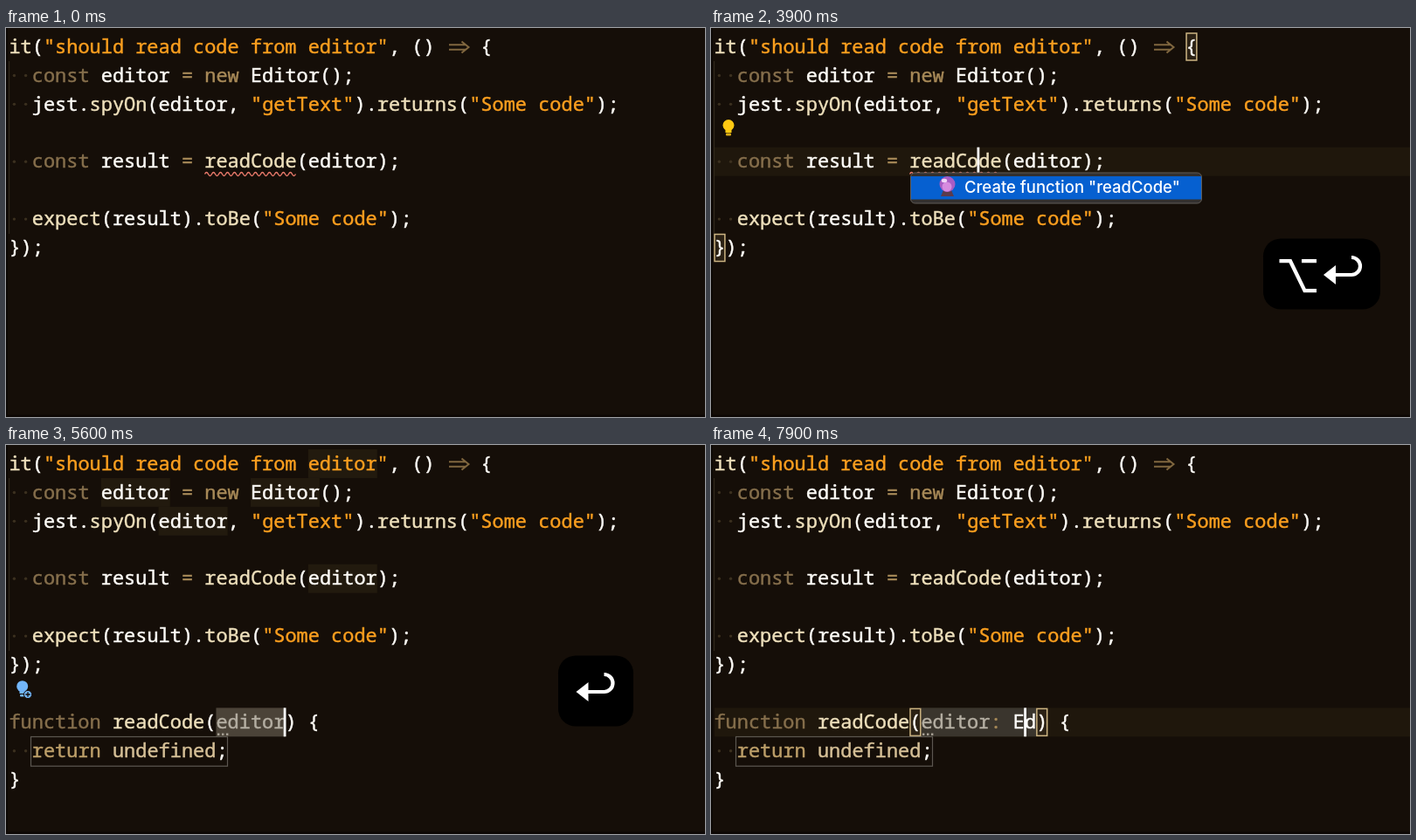
An HTML page that plays this animation: 800x446 px, repeating every 8000 ms.

```html
<!DOCTYPE html>
<html lang="en">
<head>
<meta charset="utf-8">
<title>Create function from test</title>
<style>
  html, body { margin: 0; width: 100%; height: 100%; overflow: hidden; background: #150e08; }
  svg { display: block; }
  .code { font: 500 21.95px "Noto Sans Mono", "DejaVu Sans Mono", monospace; white-space: pre; stroke-width: .45px; }
  .menu { font: 500 18.5px Inter, sans-serif; fill: #fff; }
</style>
</head>
<body>
<svg id="stage" width="800" height="446" viewBox="0 0 800 446"></svg>
<script>
const LOOP = 8000, CHAR = 13.17, LINE = 32.93;
const stage = document.getElementById('stage');
const colX = c => 3.4 + c * CHAR;
const rowY = r => 5 + r * LINE;

const COLORS = {
  w: '#fffdf8', // plain
  f: '#eee0bc', // function
  k: '#866f4c', // declaration keyword
  o: '#a88a58', // operator
  s: '#fb9f1f', // string
  r: '#bd9f69', // return
  u: '#d6c097', // undefined
  g: '#b5afa3'  // unused
};

// Moments of the story, in ms
const CLICK = 2200, KEY1 = 3400, MENU = 3600, KEY2 = 4300, CREATE = 4340,
  UNBRACE = 4500, CHECKED = 5100, BULB = 5450, DESELECT = 6500;
const KEY_LIFE = 1700, KEY_FADE = 200, CARET_MOVE = 80;
const TYPED = ': Ed', TYPE_AT = [7300, 7500, 7720, 7895];

const rect = (x, y, w, h, fill, extra = '') =>
  `<rect x="${x}" y="${y}" width="${w}" height="${h}" fill="${fill}" ${extra}/>`;
const cells = (row, col, n, fill) => rect(colX(col), rowY(row), n * CHAR, LINE, fill);
const stroke = (d, color, width) =>
  `<path d="${d}" fill="none" stroke="${color}" stroke-width="${width}"/>`;
const escapeText = s => s.replace(/&/g, '&amp;').replace(/</g, '&lt;');

// Parts alternate: colour key, text
function line(row, col, ...parts) {
  let out = '';
  for (let i = 0; i < parts.length; i += 2) {
    const color = COLORS[parts[i]], text = parts[i + 1];
    out += `<text class="code" x="${colX(col)}" y="${rowY(row) + 23.7}" fill="${color}" stroke="${color}">${escapeText(text)}</text>`;
    col += text.length;
  }
  return out;
}

const dots = row => [0, 1].map(c =>
  `<circle cx="${colX(c) + 6}" cy="${rowY(row) + 16.5}" r="1.7" fill="#3b301f"/>`).join('');

const bracketBox = (row, col) =>
  rect(colX(col) + .7, rowY(row) + 1, 11.8, 31, '#2b2114', 'stroke="#cdb583" stroke-width="1.5"');

const SQUIGGLE = stroke('M227.5 167.5' + 'q2 -4 4 0t4 0'.repeat(13), '#e8796a', 1.4);

const TEST = [1, 2, 4, 6].map(dots).join('') +
  line(0, 0, 'f', 'it', 'w', '(', 's', '"should read code from editor"', 'w', ', ()') +
  stroke('M507 19.3H526M507 24.7H526M521.5 15.5L529.5 22L521.5 28.5', '#80673f', 2) +
  line(0, 41, 'w', '{') +
  line(1, 2, 'k', 'const', 'w', ' editor ', 'o', '= new', 'w', ' Editor();') +
  line(2, 2, 'w', 'jest.', 'f', 'spyOn', 'w', '(editor, ', 's', '"getText"', 'w', ').', 'f', 'returns', 'w', '(', 's', '"Some code"', 'w', ');') +
  line(4, 2, 'k', 'const', 'w', ' result ', 'o', '= ', 'f', 'readCode', 'w', '(editor);') +
  line(6, 2, 'f', 'expect', 'w', '(result).', 'f', 'toBe', 'w', '(', 's', '"Some code"', 'w', ');') +
  line(7, 0, 'w', '});');

const WORDS = [[0, 26], [1, 8], [1, 21], [2, 13], [4, 26]]
  .map(([row, col]) => cells(row, col, 6, '#221a0e')).join('');

const YELLOW_BULB =
  '<circle cx="20" cy="111.5" r="6.5" fill="#ffc912"/>' +
  rect(16.5, 114, 7, 6, '#ffc912') + rect(17, 120.5, 6, 3, '#d9ab16', 'rx="1"');

const BLUE_BULB =
  '<circle cx="18.7" cy="276.7" r="6.5" fill="#72b6fa"/>' +
  rect(15.5, 280, 6.5, 5, '#72b6fa') + rect(16, 286, 5, 2.5, '#72b6fa', 'rx="1"') +
  '<circle cx="25" cy="286" r="4.6" fill="#72b6fa" stroke="#150e08" stroke-width="1"/>' +
  stroke('M22.3 286h5.4M25 283.3v5.4', '#150e08', 1.3);

const MENU_BOX =
  rect(228.5, 166, 333, 35, '#33302f', 'rx="5" stroke="#605c58" stroke-width="1"') +
  rect(229, 170, 332, 26.5, '#0660d0') +
  '<path d="M263 193l3-7h9l3 7z" fill="#5b3b4c"/>' +
  '<circle cx="270.5" cy="179" r="9" fill="#a85cc4"/>' +
  '<circle cx="270" cy="182" r="5.5" fill="#d78bdf"/>' +
  '<ellipse cx="267" cy="175" rx="3.2" ry="2.2" fill="#f0d5f7"/>' +
  '<text class="menu" x="290" y="189">Create function "readCode"</text>';

const arrow = x =>
  `<g transform="translate(${x} 0)">` +
  stroke('M32 21.5a10 10 0 0 1 0 20H11', '#fff', 4.2) +
  '<path d="M0 41.5L14 30.5V52.5z" fill="#fff"/></g>';

const option = stroke('M18.5 25.7H31L47.5 59.7H61M44 25.7H61', '#fff', 4.3);

function keycap(t, born, y, w, glyphs) {
  const age = t - born;
  if (age < 0 || age > KEY_LIFE + KEY_FADE) return '';
  const alpha = Math.min(1, (KEY_LIFE + KEY_FADE - age) / KEY_FADE);
  return `<g transform="translate(632 ${y})" opacity="${alpha}">` +
    rect(0, 0, w, 81, '#000', 'rx="20"') + glyphs + '</g>';
}

function caret(t) {
  const stops = [[CLICK, 23, 4], [CREATE, 24, 9], ...TYPE_AT.map((at, i) => [at, 25 + i, 9])];
  const i = stops.findLastIndex(s => t >= s[0]);
  if (i < 0) return '';
  const [at, col, row] = stops[i], [, col0, row0] = stops[Math.max(0, i - 1)];
  const p = Math.min(1, (t - at) / CARET_MOVE);
  const x = colX(col0 + (col - col0) * p), y = rowY(row0 + (row - row0) * p);
  return rect(x - 1.8, y, 2.8, LINE, '#fff');
}

function createdFunction(t, typed) {
  const checked = t >= CHECKED, typing = typed.length > 0;
  const fill = t >= DESELECT ? '#3a352d' : checked ? '#4b4338' : '#554b42';
  let out = cells(9, 18, 6 + typed.length, fill);
  if (typing) out += bracketBox(9, 17) + bracketBox(9, 24 + typed.length);
  out += rect(28.5, 334.5, 225, 33.7, 'none', 'stroke="#5c5750" stroke-width="1.2"') + dots(10);
  out += line(9, 0, 'k', 'function', 'f', ' readCode', 'w', '(', checked ? 'g' : 'w', 'editor',
    'o', typed.slice(0, 1), 'w', typed.slice(1) + ') {');
  out += line(10, 2, 'r', 'return', 'u', ' undefined', 'w', ';') + line(11, 0, 'w', '}');
  if (checked) out += [242, 247, 252].map(x => rect(x, 330.5, 2.4, 2.4, '#aaa498')).join('');
  return out;
}

function draw(t) {
  const created = t >= CREATE;
  const typed = TYPED.slice(0, TYPE_AT.filter(at => t >= at).length);
  let out = rect(0, 0, 800, 446, '#150e08');
  if (t >= CLICK && !created) out += rect(4, rowY(4), 796, LINE, '#1f170c');
  if (t >= DESELECT) out += rect(4, rowY(9), 796, LINE, '#1f170c');
  out += rect(0, 0, 2, 446, '#0c0704') + rect(0, 443.5, 800, 2.5, '#0c0704');
  out += rect(3, 38, 1.2, 198, '#30281c');
  if (created && t < DESELECT) out += WORDS;
  if (t >= CLICK && t < UNBRACE) out += bracketBox(0, 41) + bracketBox(7, 0);
  out += TEST;
  if (t < CHECKED) out += SQUIGGLE;
  if (t >= CLICK + 200 && !created) out += YELLOW_BULB;
  if (created) out += createdFunction(t, typed);
  if (t >= BULB && !typed) out += BLUE_BULB;
  out += caret(t);
  if (t >= MENU && t < KEY2) out += MENU_BOX;
  out += keycap(t, KEY1, t < KEY2 ? 241.5 : 147, 134, option + arrow(69));
  out += keycap(t, KEY2, 241.5, 86, arrow(20.5));
  return out;
}

let shown = '';
const start = performance.now();
function tick() {
  const next = draw((performance.now() - start) % LOOP);
  if (next !== shown) stage.innerHTML = shown = next;
  requestAnimationFrame(tick);
}
tick();
</script>
</body>
</html>
```
